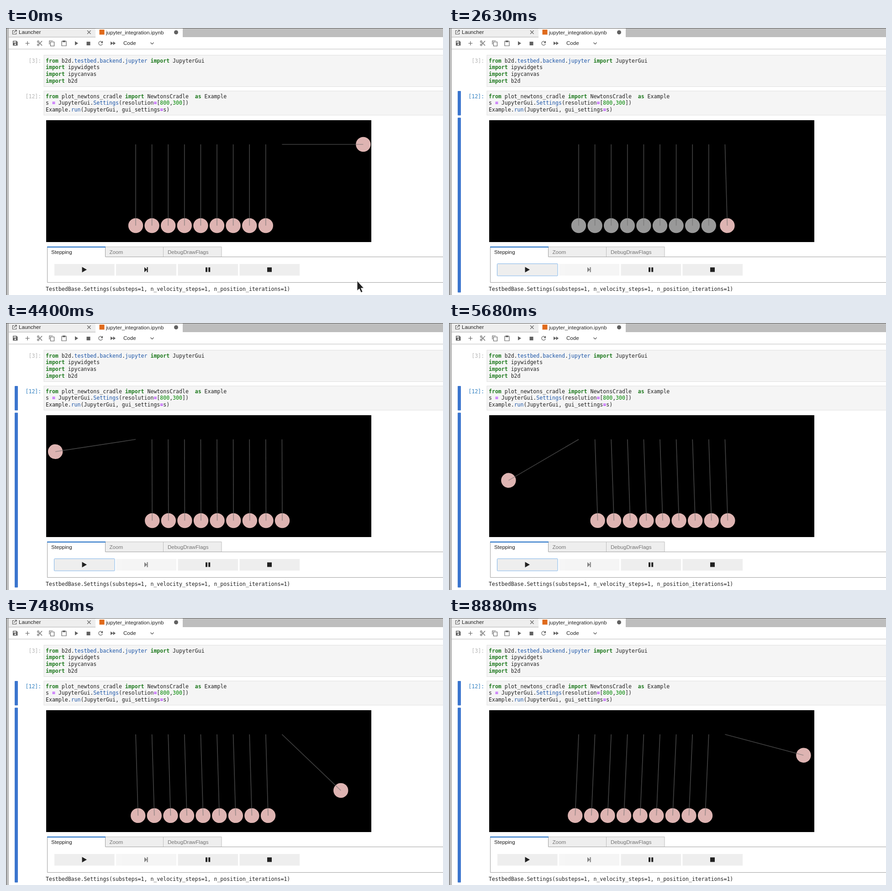
An HTML page that plays this animation: 957x585 px, repeating every 8910 ms.

```html
<!DOCTYPE html>
<html lang="en">
<head>
<meta charset="utf-8">
<title>Newton's cradle in a notebook</title>
<style>
html, body { margin: 0; width: 100%; height: 100%; overflow: hidden; background: #fff; }
svg { display: block; width: 957px; height: 585px; }
text { font: 11.6px "Liberation Sans", Arial, sans-serif; fill: #212121; white-space: pre; }
.code text { font: 11.56px "DejaVu Sans Mono", monospace; }
.code .prompt { fill: #b4b4b4; }
.code .prompt.on { fill: #307fc1; }
.k { fill: #1f7a1f; font-weight: bold; }
.p { fill: #1d56a8; }
.o { fill: #a2f; font-weight: bold; }
.n { fill: #080; }
.dim { fill: #757575; }
.icon { fill: #616161; }
.line { fill: none; stroke: #616161; stroke-width: 1.2; }
.cell { fill: #f5f5f5; stroke: #e0e0e0; }
.btn { fill: #eee; }
.rim { fill: none; stroke: #9e9e9e; }
</style>
</head>
<body>
<svg viewBox="0 0 957 585">
  <!-- window edge and document tabs -->
  <path fill="#bdbdbd" d="M0 0H957V20H0zM0 20H5V585H0z"/>
  <path fill="#eee" d="M6 1H196V20H6z"/>
  <path fill="#fff" d="M196 1H387V21H196z"/>
  <path fill="#b0b0b0" d="M5 19.5H196V20.5H5zM5 0H6V585H5z"/>
  <path fill="#5a5a5a" d="M0 0H957V1H0zM0 0H1V585H0z"/>
  <path class="line" d="M18 5.500H14.500V13.500H22.500V10M19.500 4.500H23V8M23 4.500L17.500 10"/>
  <text x="28" y="13">Launcher</text>
  <path class="line" d="M178 5.500L185.500 13M185.500 5.500L178 13"/>
  <rect x="204.500" y="3.500" width="11" height="11" fill="#e06a1c"/>
  <text x="219" y="13.500">jupyter_integration.ipynb</text>
  <circle class="icon" cx="372.500" cy="9.500" r="4.500"/>

  <!-- toolbar -->
  <path fill="#bdbdbd" d="M6 45.500H957V46.500H6z"/>
  <path fill="#efefef" d="M6 46.500H957V48H6z"/>
  <path class="icon" fill-rule="evenodd" d="M15 28H23L25.500 30.500V38.500H15zM16.500 29.500V32H22V29.500zM20.200 33.700a1.700 1.700 0 1 0 .1 0z"/>
  <path class="line" stroke-width="1.500" d="M42.500 33.500H51.500M47 29V38"/>
  <g class="line">
    <circle cx="70.500" cy="30" r="1.800"/><circle cx="70.500" cy="37" r="1.800"/>
    <path d="M72 31.300L79 38.500M72 35.700L79 28.500"/>
    <path d="M95 36V28H102.500M97.500 30.500H105.500V39.500H97.500z"/>
    <path d="M122 29H132V39H122z"/>
    <path d="M210.800 31A4.300 4.300 0 1 0 211.300 34.800"/>
    <path stroke-width="1.400" d="M316.500 31.800L320 35.300L323.500 31.800"/>
  </g>
  <path class="icon" d="M124 27.500H130V31H124zM151 29V38L158 33.500zM176.500 30H184.500V38H176.500zM212 28V33H207zM229 29.500V37.500L234.500 33.500zM234.500 29.500V37.500L240 33.500z"/>
  <text x="257" y="37.200">Code</text>

  <!-- notebook cells -->
  <g id="bars" fill="#3b75ce">
    <rect x="19" y="138" width="7" height="53.500" rx="1"/>
    <rect x="19" y="196.500" width="7" height="383" rx="1"/>
  </g>
  <rect class="cell" x="83" y="59.500" width="890" height="69"/>
  <rect class="cell" x="83" y="138" width="890" height="53"/>
  <g class="code">
    <text class="prompt" x="49.500" y="75.500">[3]:</text>
    <text class="prompt" id="prompt" x="42.500" y="153.500">[12]:</text>
    <text x="87" y="75.500"><tspan class="k">from</tspan> b2d.<tspan class="p">testbed</tspan>.<tspan class="p">backend</tspan>.<tspan class="p">jupyter</tspan> <tspan class="k">import</tspan> JupyterGui</text>
    <text x="87" y="90.200"><tspan class="k">import</tspan> ipywidgets</text>
    <text x="87" y="105"><tspan class="k">import</tspan> ipycanvas</text>
    <text x="87" y="119.700"><tspan class="k">import</tspan> b2d</text>
    <text x="87" y="153.500"><tspan class="k">from</tspan> plot_newtons_cradle <tspan class="k">import</tspan> NewtonsCradle  <tspan class="k">as</tspan> Example</text>
    <text x="87" y="168.300">s <tspan class="o">=</tspan> JupyterGui.<tspan class="p">Settings</tspan>(resolution<tspan class="o">=</tspan>[<tspan class="n">800</tspan>,<tspan class="n">300</tspan>])</text>
    <text x="87" y="183">Example.<tspan class="p">run</tspan>(JupyterGui, gui_settings<tspan class="o">=</tspan>s)</text>
    <text x="87" y="576">TestbedBase.Settings(substeps=1, n_velocity_steps=1, n_position_iterations=1)</text>
  </g>

  <rect x="88" y="202" width="712" height="267"/>
  <g id="cradle"></g>

  <!-- control panel -->
  <path class="rim" d="M960 501.500H90.500V557.500H960"/>
  <path fill="#eee" stroke="#bdbdbd" d="M217.500 479.500H344.500V501.500H217.500zM344.500 479.500H472V501.500H344.500z"/>
  <path class="rim" d="M217.500 501.500H472"/>
  <path fill="#fff" d="M90 479H218V503H90z"/>
  <path class="rim" d="M90.500 503V479M217.500 501.500V479"/>
  <path fill="#2f78c8" d="M90 478.800H218V481H90z"/>
  <text x="99" y="494.500">Stepping</text>
  <text class="dim" x="226.500" y="494.700">Zoom</text>
  <text class="dim" x="354" y="494.700">DebugDrawFlags</text>
  <rect id="shade" x="106" y="519" width="132" height="25" fill="#c4c4c4"/>
  <rect class="btn" x="106" y="517" width="131.500" height="25.500"/>
  <rect id="focus" x="105.500" y="516.500" width="132.500" height="26.500" rx="1" fill="none" stroke="#7db2e8"/>
  <path d="M166.500 523.500V535.500L177 529.500z" fill="#212121"/>
  <g id="step">
    <rect class="btn" x="241" y="517" width="132" height="25.500"/>
    <path d="M303 524V535L309 529.500zM308.500 524H310.700V535H308.500z" fill="#212121"/>
  </g>
  <rect class="btn" x="376.500" y="517" width="131.500" height="25.500"/>
  <rect class="btn" x="511.500" y="517" width="131.500" height="25.500"/>
  <path d="M437 524.500H441V534.500H437zM443.200 524.500H447.200V534.500H443.200zM572 524.500H582V534.500H572z" fill="#212121"/>

  <path id="cursor" d="M0 0V21.500L4.800 17.300L8.500 25.500L12 24L8.400 16H14.500z" fill="#222" stroke="#fff" stroke-width=".8"/>
</svg>
<script>
const LOOP = 8910, COUNT = 10, LENGTH = 178, PIVOT_Y = 255;
const $ = id => document.getElementById(id);
const clamp01 = v => Math.min(1, Math.max(0, v));
const mix = (a, b, k) => a + (b - a) * k;
const ease = k => k * k * (3 - 2 * k);

const pivot = i => 284 + 35.6 * i;
$('cradle').innerHTML = Array.from({length: COUNT}, (_, i) =>
  `<g><circle cx="${pivot(i)}" cy="${PIVOT_Y + LENGTH}" r="16.2"/>
   <path d="M${pivot(i)} ${PIVOT_Y}v${LENGTH}" stroke="#6e6e6e" stroke-opacity=".58" stroke-width="1.7"/></g>`).join('');
const balls = [...$('cradle').children];

// Angle of a free pendulum that is at rest at angle `peak` (degrees) at time `at`.
function swing(t, peak, at) {
  const span = Math.abs(t - at) / 1000, steps = Math.ceil(span / 0.005) || 1, dt = span / steps;
  let angle = peak * Math.PI / 180, speed = -Math.sin(angle) * dt / 2;
  for (let n = 0; n < steps; n++) {
    angle += speed * dt;
    speed -= Math.sin(angle) * dt;
  }
  return angle;
}

// Slow common sway of the resting balls after each impact.
const swayA = t => 6.1 / LENGTH * Math.sin((t - 4300) / 1000);
const swayB = t => -10.2 / LENGTH * Math.sin((t - 8020) / 1000);

function angleOf(i, t) {
  const hitA = 2667 + (8 - i) * 30, hitB = 6580 + (i - 1) * 26;
  if (i === 0) {
    if (t < 2900) return 0;
    const free = swing(t, -84.6, 4740);
    if (t < 4740) return Math.min(0, free);
    return t < 6700 ? Math.min(free, swayB(t)) : swayB(t);
  }
  if (i === 9) {
    if (t < 930) return Math.PI / 2;
    if (t < 2800) return Math.max(swing(t, 90, 797), swayA(t));
    return t < 6740 ? swayA(t) : Math.max(swayA(t), swing(t, 78, 8560));
  }
  const first = mix(0, swayA(t), clamp01((t - hitA) / 28));
  return mix(first, swayB(t), clamp01((t - hitB) / 26));
}

function show(id, on) { $(id).style.display = on ? '' : 'none'; }

function draw(t) {
  balls.forEach((ball, i) => {
    ball.setAttribute('transform', `rotate(${-angleOf(i, t) * 180 / Math.PI} ${pivot(i)} ${PIVOT_Y})`);
    const wake = 2667 + (8 - i) * 30;
    const asleep = i < 9 && t > 1400 && t < wake;
    ball.firstChild.setAttribute('fill', asleep ? '#999' : '#deb4b2');
  });

  const clicked = t >= 930;
  show('bars', clicked);
  $('prompt').classList.toggle('on', clicked);
  $('step').setAttribute('opacity', clicked ? 0.55 : 1);
  show('focus', clicked && t < 6850);
  show('shade', t > 600 && t < 1060);

  const go = ease(clamp01((t - 250) / 400)), leave = clamp01((t - 1000) / 130);
  $('cursor').setAttribute('transform', `translate(${mix(769, 182, go)} ${mix(554, 526, go) + 31 * leave})`);
  show('cursor', t < 1130);
}

const start = performance.now();
function frame() {
  draw((performance.now() - start) % LOOP);
  requestAnimationFrame(frame);
}
frame();
</script>
</body>
</html>
```
